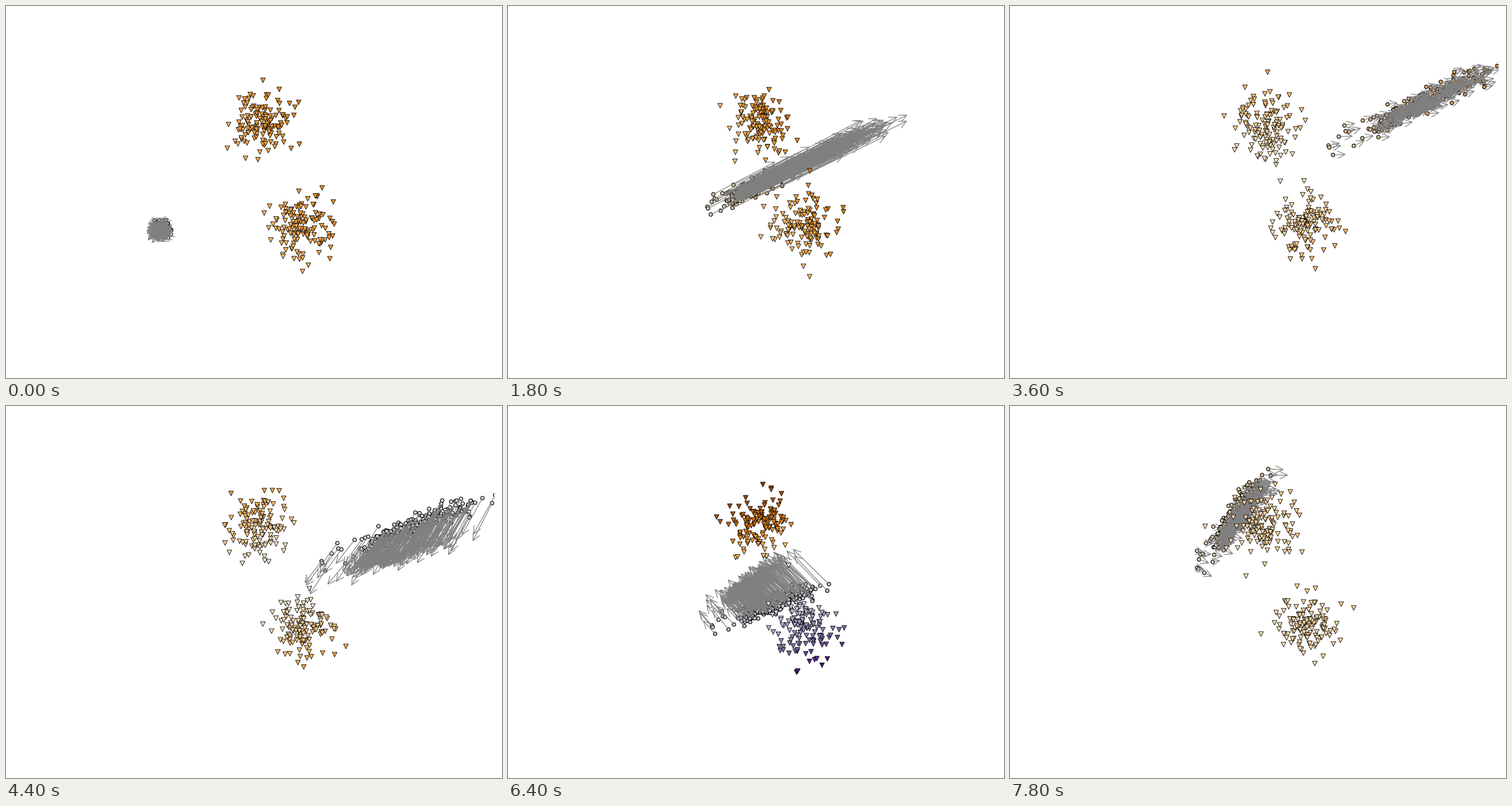
Write a matplotlib script that moves like this. It is 864x648 px and loops after 8 s.

```python
import numpy as np
import matplotlib.pyplot as plt
from matplotlib.animation import FuncAnimation
from matplotlib.collections import LineCollection

W, H, DPI = 864, 648, 100
FRAMES, INTERVAL = 40, 200
MARGIN = 13
N_CLOUD, N_GROUP = 280, 130
GROUPS = [(441, 207), (516, 384)]
GROUP_SD = 27

# Key points of the cloud: its centre and its long axis
STEPS = np.array([0, 5, 7, 10, 13, 22, 26, 32, 39])
CENTRE = np.array([(272, 389), (285, 388), (302, 380), (495, 283), (620, 222),
                   (705, 212), (605, 342), (460, 346), (390, 194)])
AXIS = np.array([(6, 0), (7, -2), (11, -5), (36, -16), (52, -23),
                 (55, -22), (52, -9), (37, -14), (22, -32)])

rng = np.random.default_rng(4)
Z = rng.normal(size=(N_CLOUD, 2))
Z = np.clip((Z - Z.mean(0)) / Z.std(0), -2.8, 2.8)
WOBBLE = rng.normal(0, 2.5, (N_CLOUD, 2))
CMAP = plt.get_cmap("PuOr")


def spline(knots, pts, v0, v1):
    """Smooth path through pts with given end speeds; returns place and speed."""
    h = np.diff(knots)[:, None]
    slope = np.diff(pts, axis=0) / h
    n = len(knots)
    a, rhs = np.eye(n), np.zeros((n, 2))
    rhs[0], rhs[-1] = v0, v1
    for i in range(1, n - 1):
        l, r = 1 / h[i - 1, 0], 1 / h[i, 0]
        a[i, i - 1:i + 2] = l, 2 * (l + r), r
        rhs[i] = 3 * (l * slope[i - 1] + r * slope[i])
    m = np.linalg.solve(a, rhs)

    def at(t):
        i = min(np.searchsorted(knots, t, side="right") - 1, n - 2)
        u, d = t - knots[i], h[i, 0]
        c2 = (3 * slope[i] - 2 * m[i] - m[i + 1]) / d
        c3 = (m[i] + m[i + 1] - 2 * slope[i]) / d**2
        return (pts[i] + u * (m[i] + u * (c2 + u * c3)),
                m[i] + u * (2 * c2 + 3 * u * c3))
    return at


centre_at = spline(STEPS, CENTRE, (-5, 2.5), (9.5, 1))
axis_at = spline(STEPS, AXIS, (0, 0), (1.5, 0))


def cloud(t):
    """Centre, unit normal of the long axis, particles and their speeds."""
    centre, speed = centre_at(t)
    axis, growth = axis_at(t)
    size = np.hypot(*axis)
    normal = np.array([-axis[1], axis[0]]) / size
    along, across = Z[:, :1], Z[:, 1:]
    pts = centre + along * axis + across * normal * (5.5 + .05 * size)
    return centre, normal, pts, speed + along * growth


def colours(pts, t, centre, normal):
    """A slanted ramp that folds along the cloud, then tilts through it."""
    bias = np.interp(t, [0, 5, 13, 22, 26, 32, 39],
                     [.48, .68, .27, 0, 0, -.15, .24])
    ramp = np.interp(t, [0, 5, 13, 22, 32, 39], [.12, .22, .17, 0, 0, .06])
    fold = np.interp(t, [13, 22, 26, 32], [0, .3, .35, 0])
    tilt = np.interp(t, [26, 32, 39], [0, .57, 0])
    x, y = ((pts - (480, 300)) / 100).T
    d = (pts - centre) @ normal / 100
    s = bias + ramp * (x - .55 * y) + fold * np.abs(d) - tilt * d
    return CMAP(.5 - .5 * np.clip(s, -1, 1))


def arrows(start, vec):
    """Shafts with open heads of a fixed size."""
    tip = start + vec
    d = vec / np.maximum(np.hypot(*vec.T), 1e-6)[:, None]
    side = 6.5 * np.column_stack([-d[:, 1], d[:, 0]])
    back = tip - 13.5 * d
    shafts = np.stack([start, tip], axis=1)
    heads = np.stack([back + side, tip, back - side], axis=1)
    return list(shafts) + list(heads)


def triangles(t):
    r = np.random.default_rng(100 + t)
    return np.vstack([r.normal(g, GROUP_SD, (N_GROUP, 2)) for g in GROUPS])


fig = plt.figure(figsize=(W / DPI, H / DPI), dpi=DPI, facecolor="white")
ax = fig.add_axes([MARGIN / W, MARGIN / H, 1 - 2 * MARGIN / W, 1 - 2 * MARGIN / H])
ax.set_xlim(MARGIN, W - MARGIN)
ax.set_ylim(H - MARGIN, MARGIN)
ax.axis("off")

dots = ax.scatter([], [], s=20, marker="o", edgecolors="black",
                  linewidths=.9, zorder=1)
lines = LineCollection([], colors="gray", linewidths=.9, zorder=2)
ax.add_collection(lines)
marks = ax.scatter([], [], s=36, marker="v", edgecolors="black",
                   linewidths=.6, zorder=3)


def draw(t):
    centre, normal, pts, speed = cloud(t)
    dots.set_offsets(pts)
    dots.set_facecolors(colours(pts, t, centre, normal))
    lines.set_segments(arrows(pts, 2 * speed + WOBBLE))
    tri = triangles(t)
    marks.set_offsets(tri)
    marks.set_facecolors(colours(tri, t, centre, normal))
    return dots, lines, marks


anim = FuncAnimation(fig, draw, frames=FRAMES, interval=INTERVAL,
                     repeat=True, repeat_delay=0, blit=False)
plt.show()
```
